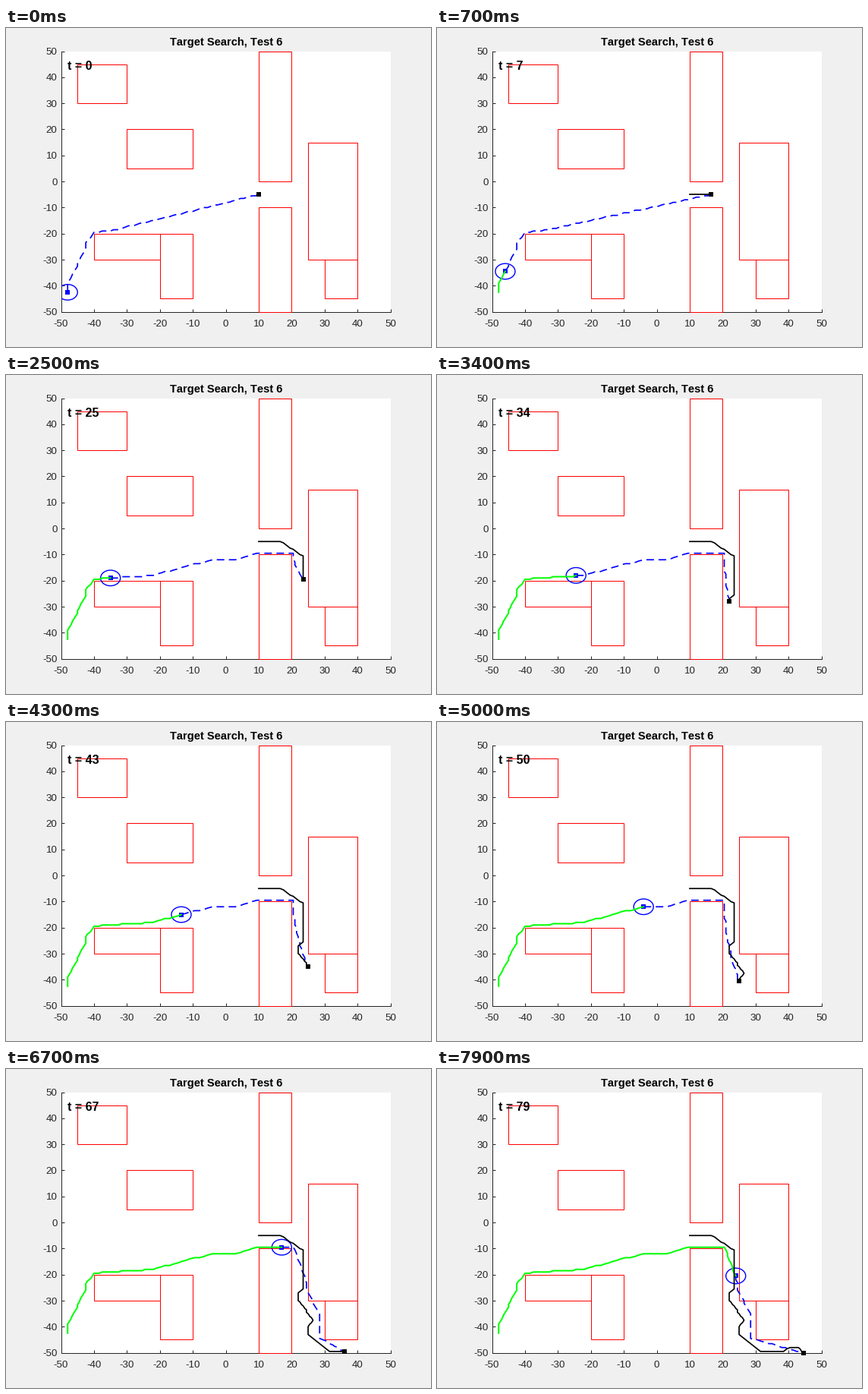
A matplotlib script that plays this animation: 560 px wide and 420 px high, repeating every 8 s.

```python
import numpy as np
import matplotlib.pyplot as plt
from matplotlib.animation import FuncAnimation
from matplotlib.patches import Circle, Rectangle

W, H, DPI = 560, 420, 100
PX = 72 / DPI  # points per pixel
FRAMES, STEP_MS = 80, 100
CELL = 0.5  # both agents move on this lattice
SPEED = 1.2
INK = "#262626"

plt.rcParams["font.family"] = "Liberation Sans"
plt.rcParams["text.kerning_factor"] = 6
plt.rcParams["axes.unicode_minus"] = False

# x, y, width, height
WALLS = [
    (-45, 30, 15, 15), (-30, 5, 20, 15), (10, 0, 10, 50), (10, -50, 10, 40),
    (-40, -30, 20, 10), (-20, -45, 10, 25), (25, -30, 15, 45), (30, -45, 10, 15),
]

# Turning points: time, x, y. The seeker's go on past the end of the loop.
SEEKER = np.array([
    (0, -48, -42.5), (3, -48, -39), (15, -42.5, -26), (17, -42.5, -23.5),
    (21, -40, -19.5), (25, -35, -19), (36, -22, -18), (43, -13.5, -15),
    (50, -4, -12), (56, 3, -12), (61, 9.5, -9.5), (70, 20.5, -9.5),
    (79, 24, -20.5), (83, 24.5, -26), (92, 28.5, -35), (99, 28.5, -44.5),
])
RUNNER = np.array([
    (0, 10, -5), (7, 16.5, -5), (16, 23.5, -10.5), (31, 23.5, -25.5),
    (33, 22, -27), (36, 22, -30), (46, 26.5, -37.5), (49, 25, -40),
    (53, 25, -43), (62, 31.5, -49.5), (70, 38.5, -49.5), (72, 40.5, -48),
    (76, 43, -48), (79, 44.5, -50),
])
# As the runner rounds a corner, the plan needs more of the seeker's turns.
REACH = [(0, 25), (11, 61), (17, 70), (60, 99)]


def snap(pts):
    return np.floor(pts / CELL + 0.5) * CELL


def walk(turns, start, stop):
    """Lattice positions for every step from start to stop."""
    t = np.arange(start, stop + 1)
    return snap(np.column_stack([np.interp(t, turns[:, 0], c) for c in turns.T[1:]]))


def last_leg(a, b):
    """Straight run to b; steep runs drift sideways late."""
    d = b - a
    u = np.linspace(0, 1, int(np.hypot(*d) / SPEED) + 2)
    steep = abs(d[1]) > abs(d[0])
    return snap(np.column_stack([a[0] + d[0] * (u**2 if steep else u), a[1] + d[1] * u]))


def plan(t, goal):
    reach = [stop for start, stop in REACH if start <= t][-1]
    ahead = walk(SEEKER, t, reach)
    return np.vstack([ahead, last_leg(ahead[-1], goal)])


fig = plt.figure(figsize=(W / DPI, H / DPI), dpi=DPI, facecolor="#f0f0f0")
ax = fig.add_axes([72.55 / W, 46.4 / H, 434 / W, 343 / H])
ax.set(xlim=(-50, 50), ylim=(-50, 50),
       xticks=range(-50, 51, 10), yticks=range(-50, 51, 10))
ax.tick_params(direction="in", length=4.3 * PX, width=PX, color=INK,
               labelcolor=INK, labelsize=13.33 * PX)
ax.tick_params(axis="x", pad=10.5 * PX)
ax.tick_params(axis="y", pad=5 * PX)
for side, spine in ax.spines.items():
    spine.set(visible=side in ("left", "bottom"), linewidth=PX, color=INK)

fig.text(290 / W, (H - 23) / H, "Target Search, Test 6", ha="center",
         va="baseline", size=14.67 * PX, weight="bold")
clock = fig.text(81.4 / W, (H - 55) / H, "", va="baseline", size=16 * PX, weight="bold")

for x, y, w, h in WALLS:
    ax.add_patch(Rectangle((x, y), w, h, fill=False, ec="red", lw=PX,
                           zorder=2.6, clip_on=False))


def line(color, width, z, **kw):
    return ax.plot([], [], color=color, lw=width * PX, zorder=z, **kw)[0]


def square(color, z):
    return ax.plot([], [], "s", color=color, ms=6 * PX, mew=0, zorder=z, clip_on=False)[0]


route = line("blue", 1.7, 3, dashes=(10 / 1.7, 6 / 1.7), dash_capstyle="butt")
ring = ax.add_patch(Circle((0, 0), 3, fill=False, ec="blue", lw=1.4 * PX, zorder=4))
seeker = square("blue", 5)
seek_trail = line("lime", 2, 6)
run_trail = line("black", 1.7, 7, clip_on=False)
runner = square("black", 8)


def draw(t):
    seek, run = walk(SEEKER, 0, t), walk(RUNNER, 0, t)
    route.set_data(*plan(t, run[-1]).T)
    ring.center = tuple(seek[-1])
    seeker.set_data(*seek[-1:].T)
    seek_trail.set_data(*seek.T)
    run_trail.set_data(*run.T)
    runner.set_data(*run[-1:].T)
    clock.set_text(f"t = {t}")
    return route, ring, seeker, seek_trail, run_trail, runner, clock


anim = FuncAnimation(fig, draw, frames=FRAMES, interval=STEP_MS, repeat=True)
plt.show()
```
